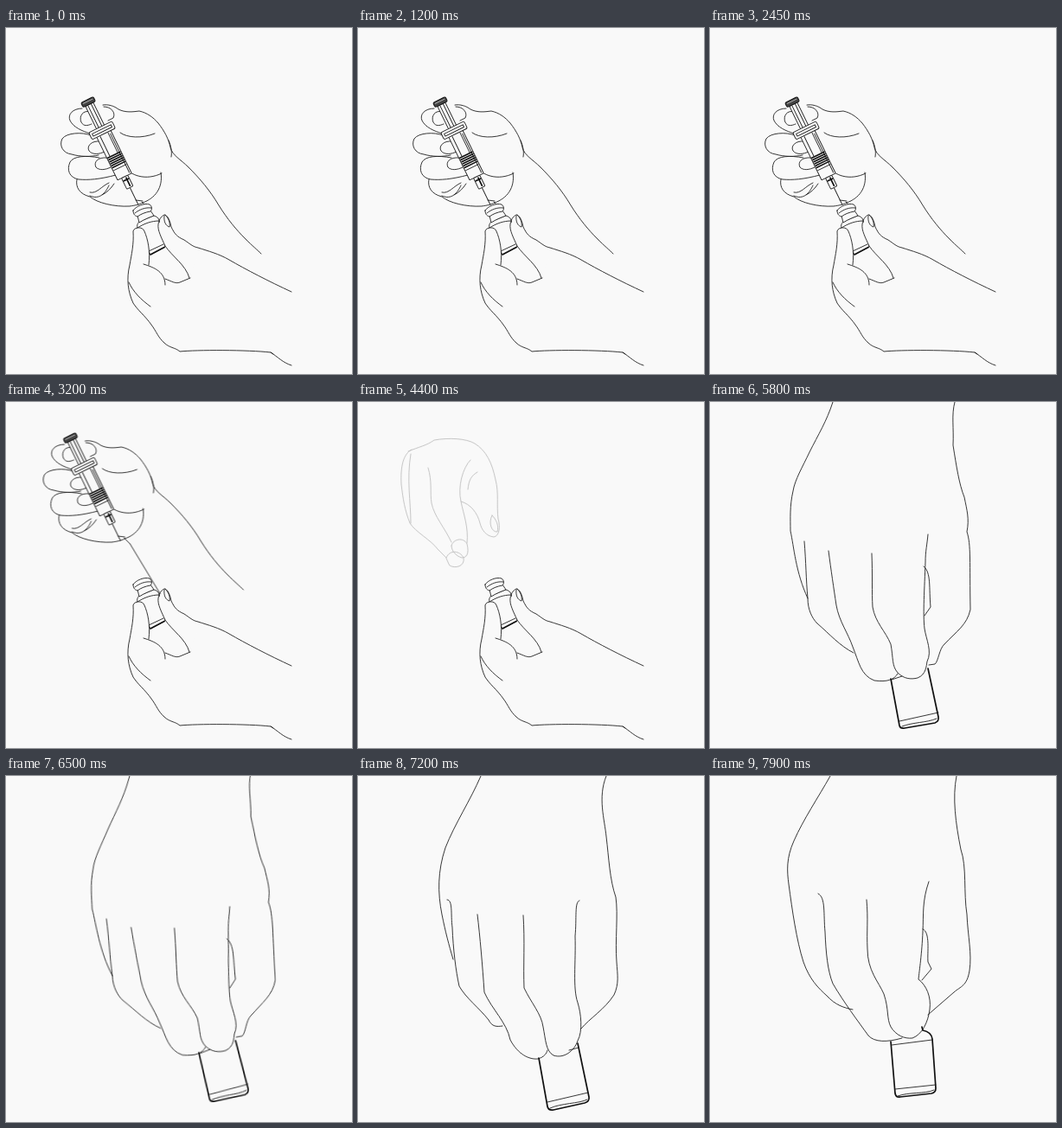
Write an HTML page that moves like this. It is 400 by 400 pixels and loops after 8 s.

```html
<!DOCTYPE html>
<html lang="en">
<head>
<meta charset="utf-8">
<title>Syringe and vial</title>
<style>
  html, body { margin: 0; width: 100%; height: 100%; overflow: hidden; background: #f9f9f9; }
  svg { display: block; width: 100vw; height: 100vh; }
  path, rect { fill: none; stroke: #222; stroke-width: .9; stroke-linecap: round; stroke-linejoin: round; }
  .paper { fill: #f9f9f9; }
  .mask { fill: #f9f9f9; stroke: none; }
  .bold { stroke: #111; stroke-width: 1.7; }
  .dark { fill: #444; stroke: #111; }

  .draw, .hold, .reach, .swing, .cel { animation: 8s linear infinite; }
  .draw { animation-name: draw; }
  .hold { animation-name: hold; }
  .reach { animation-name: reach; }
  .swing { animation-name: swing; transform-origin: 210px 0; animation-timing-function: cubic-bezier(.37, 0, .63, 1); }
  .cel { animation-timing-function: step-end; }
  .first { animation-name: first; }
  .second { animation-name: second; }
  .third { animation-name: third; }

  /* syringe hand withdraws, then lifts away */
  @keyframes draw {
    0% { transform: none; }
    30.625% { transform: none; animation-timing-function: cubic-bezier(.37, 0, .63, 1); }
    41.875% { transform: translate(-22px, -47px); }
    45.625% { transform: translate(-22px, -47px); opacity: 1; }
    52.5%, 100% { transform: translate(-37px, -71px); opacity: 0; }
  }
  /* lower hand slips off to the right */
  @keyframes hold {
    0%, 58% { transform: none; opacity: 1; }
    62.5% { transform: translate(7px, 12px); opacity: 1; }
    66.25%, 100% { transform: translate(16px, 32px); opacity: 0; }
  }
  @keyframes reach {
    0%, 53.75% { transform: none; opacity: 0; }
    55% { transform: none; opacity: .27; }
    57.5% { transform: translate(2px, 4px); opacity: 1; animation-timing-function: ease-in-out; }
    62.5% { transform: translate(42px, 28px); opacity: 1; }
    66.25%, 100% { transform: translate(44px, 30px); opacity: 0; }
  }
  @keyframes swing {
    0%, 65.6% { transform: rotate(14deg); opacity: 0; }
    68.125% { transform: rotate(14deg); opacity: 1; }
    72.5% { transform: none; }
    76.875% { transform: rotate(16deg); }
    81.25% { transform: rotate(-2.5deg); }
    85.625% { transform: rotate(14deg); }
    90% { transform: none; }
    94.375% { transform: rotate(14deg); }
    98.75%, 100% { transform: none; opacity: 1; }
  }
  @keyframes first { 0% { opacity: 1; } 85.625%, 100% { opacity: 0; } }
  @keyframes second { 0% { opacity: 0; } 85.625% { opacity: 1; } 94.375%, 100% { opacity: 0; } }
  @keyframes third { 0% { opacity: 0; } 94.375%, 100% { opacity: 1; } }
</style>
</head>
<body>
<svg viewBox="0 0 400 400">
  <g class="draw">
    <!-- hand and forearm -->
    <path d="M112 89C118 88 125 90 130 94C138 98 146 97 154 96C163 98 170 103 176 110C183 119 188 128 190 138C192 147 202 152 211 161C224 174 236 188 246 205C256 221 266 233 277 244C285 252 290 256 295 261"/>
    <path d="M188 130C191 137 192 143 191 149M164 208L199 266L216 297M157 201L164 208"/>
    <path d="M88 93C77 93 71 100 74 107C78 115 88 119 97 122M98 97C89 94 84 102 87 109C90 114 94 113 99 111M113 91C122 91 127 98 124 104L118 107"/>
    <path d="M98 124C88 120 70 121 65 128C61 136 66 145 76 146C86 149 98 149 107 147M109 131C98 130 93 137 96 142C100 147 108 146 114 143"/>
    <path d="M108 150C92 147 78 148 74 155C70 164 73 173 84 175C95 176 108 175 127 170M117 150C106 149 101 155 104 161C108 165 115 164 121 161"/>
    <path d="M82 175C80 184 85 192 97 195C105 202 125 207 143 206C150 205 154 204 158 202C172 197 182 185 179 167"/>
    <path d="M97 190C105 192 110 183 119 179M97 194C108 199 115 191 119 182M111 193C117 190 121 186 125 180M132 121C140 127 157 128 172 122M136 159C143 171 162 177 180 168M150 199L158 200"/>
    <!-- syringe -->
    <g transform="translate(95.5 86.5) rotate(-26)">
      <path d="M0 106V131"/>
      <rect class="paper" x="-5" y="2" width="10" height="34"/>
      <path d="M-2 3V34M2 3V34" stroke-width="1.4"/>
      <rect class="dark" x="-8" y="-4" width="16" height="6" rx="2"/>
      <path d="M-6 -2H6" style="stroke:#bbb"/>
      <rect class="paper" x="-9" y="39" width="18" height="56" rx="1"/>
      <path d="M-5 41V66M5 41V66M7 43V93"/>
      <path class="bold" d="M-8 67H8M-8 69.5H8M-8 72H8M-8 74.5H8M-8 77H8M-8 79.5H8" style="stroke-width:1.5"/>
      <path d="M-8 83H8"/>
      <rect class="paper" x="-15" y="31" width="30" height="9" rx="2"/>
      <path d="M-12 34H12V37H-12Z"/>
      <rect class="paper" x="-4" y="95" width="8" height="14" rx="1"/>
      <path class="bold" d="M1 97V107M-3 99H3"/>
    </g>
  </g>

  <g class="hold">
    <path class="mask" d="M147 237L145 262L140 290L147 318L183 364L201 373L306 375L330 390V305L225 255L206 244L190 224L178 222L165 255Z"/>
    <!-- vial -->
    <path class="paper" d="M154 224C150 228 152 231 153 234L167 262L184 253L177 222C176 219 174 218 171 217Z"/>
    <path d="M152 231C160 226 168 223 177 223M165 258L182 250"/>
    <path class="bold" d="M167 262L183 253.5"/>
    <path class="paper" d="M152 217L154 225C160 221 166 219 171 217L167 211Z"/>
    <path class="paper" d="M147 211C150 206 160 202 166 204C169 206 169 210 167 212C161 213 156 215 152 218C148 217 147 214 147 211Z"/>
    <path d="M149 214C154 210 161 207 168 208"/>
    <!-- fingers and palm -->
    <path class="mask" d="M146 237C148 230 158 229 160 235C164 244 167 258 165 274L145 270Z"/>
    <path class="mask" d="M176 227C176 234 180 243 184 252C192 264 208 274 212 289L225 255L206 245L191 230L184 216Z"/>
    <path d="M165 274C167 258 164 244 160 235C158 229 148 230 147 235C148 250 145 262 143 274C139 290 141 305 147 318C152 326 161 333 168 343C174 351 176 358 183 364C189 370 195 369 201 374C220 372 280 372 306 375C314 380 320 387 330 390M306 375L309 377"/>
    <path d="M142 294C147 305 156 314 167 322M159 273C172 277 184 282 184 297M184 290C192 293 196 296 201 294L213 289"/>
    <path d="M212 289C208 274 192 264 184 252C180 243 175 234 176 227C177 220 181 216 184 216C188 218 190 225 191 230C195 238 197 241 206 245C212 249 216 253 222 254C234 258 246 261 258 268C277 279 304 293 330 305M183 217C182 224 185 229 189 230C190 225 188 220 184 216"/>
  </g>

  <g class="reach">
    <path d="M58 57C70 52 80 50 88 44C105 41 125 42 135 48C148 56 155 70 159 90C163 105 160 120 162 135C165 145 163 155 157 156C148 155 143 148 141 140C138 128 130 118 119 115C115 98 121 76 130 67"/>
    <path d="M62 55C52 60 49 75 50 95C52 112 54 125 60 140C66 150 85 160 92 170L102 180M61 60C56 90 61 115 61 140M81 76C86 92 83 105 85 117C88 132 100 145 108 162M119 115C122 130 128 145 126 163M127 101C128 90 131 85 138 81"/>
    <path d="M108 166C110 158 122 156 126 164C129 176 125 180 120 180C113 178 108 172 108 166M102 180C106 170 118 172 122 180C124 190 112 193 106 189ZM155 131C150 140 155 151 161 150C163 143 160 136 155 131"/>
  </g>

  <g class="swing">
    <g class="cel first">
      <path d="M155 -40L142 0C135 22 125 38 115 58C107 75 98 90 96 103C92 120 93 135 93 149C97 167 99 197 113 227"/>
      <path d="M109 161C111 185 111 205 113 227C113 240 118 250 124 256C138 268 150 282 166 290M137 172C140 195 143 215 146 235C149 253 160 268 165 283C172 300 174 316 190 322C205 324 213 321 217 314"/>
      <path d="M187 175C188 200 187 220 188 237C191 255 203 265 209 280C212 296 210 305 217 313C224 320 232 321 240 319C250 315 250 305 251 300C257 288 250 275 248 262C246 245 248 215 249 185C249 172 251 165 252 153M247 190C256 197 253 215 255 237L248 247"/>
      <path d="M286 -40L283 0C279 15 282 30 281 50C285 75 288 95 294 110C297 125 300 135 297 150C302 165 300 185 301 240C297 258 285 265 271 280C265 285 264 300 260 303L253 304"/>
      <path class="bold" d="M209 320L219 374Q220 378 225 377L260 371Q265 369 264 364L252 308"/>
      <path d="M219 369L264 359M222 375C235 370 250 371 262 366M210 321L222 317"/>
    </g>
    <g class="cel second">
      <path d="M157 -40L142 0C130 28 112 55 101 83C92 110 92 135 97 160C101 180 105 195 110 212"/>
      <path d="M103 143C110 143 107 160 109 175C110 200 113 225 117 243C125 257 140 268 151 282C155 290 160 290 167 289M138 160C141 185 144 220 146 250C155 270 172 285 176 305C185 322 198 328 208 327C215 325 218 321 219 317"/>
      <path d="M191 161C193 190 191 220 192 245C200 262 212 275 214 290C217 305 217 318 226 323C238 327 250 318 254 306C260 295 258 275 254 262C248 245 252 215 251 185C253 165 250 145 256 144"/>
      <path d="M292 -40L287 0C277 25 285 50 287 70C290 95 291 120 298 140C301 160 297 190 299 215C300 230 302 240 296 253C285 270 268 280 258 292"/>
      <path class="bold" d="M209 326L219 382Q220 387 226 386L262 378Q268 376 267 371L254 309"/>
      <path d="M219 377L266 366M222 384C235 378 255 379 265 374M244 317L255 314"/>
    </g>
    <g class="cel third">
      <path d="M160 -40L139 0C125 25 108 50 97 75C88 95 89 110 91 125C95 155 100 190 108 215C115 235 125 245 135 254C145 265 155 268 165 270"/>
      <path d="M125 136C134 140 131 160 133 180C134 205 136 225 142 240C155 262 170 282 183 300C190 308 205 308 222 303"/>
      <path d="M181 143C183 165 181 180 182 200C182 225 195 238 201 252C207 270 204 280 209 290C215 300 225 304 234 303C245 299 252 285 254 270C256 255 250 242 241 235C242 225 245 205 246 180C247 160 245 145 253 122M246 177C255 180 251 205 252 215L256 223L245 236"/>
      <path d="M288 -40L285 0C280 25 284 55 290 85C297 105 293 135 297 160C298 185 303 205 300 225C297 243 290 243 282 250L252 276"/>
      <path class="bold" d="M209 307L214 367Q215 372 220 371L256 367Q261 366 261 361L257 304Q256 296 246 294L245 290"/>
      <path d="M210 311L257 305M214 362L261 357M217 370C230 365 248 368 259 363"/>
    </g>
  </g>
</svg>
</body>
</html>
```
